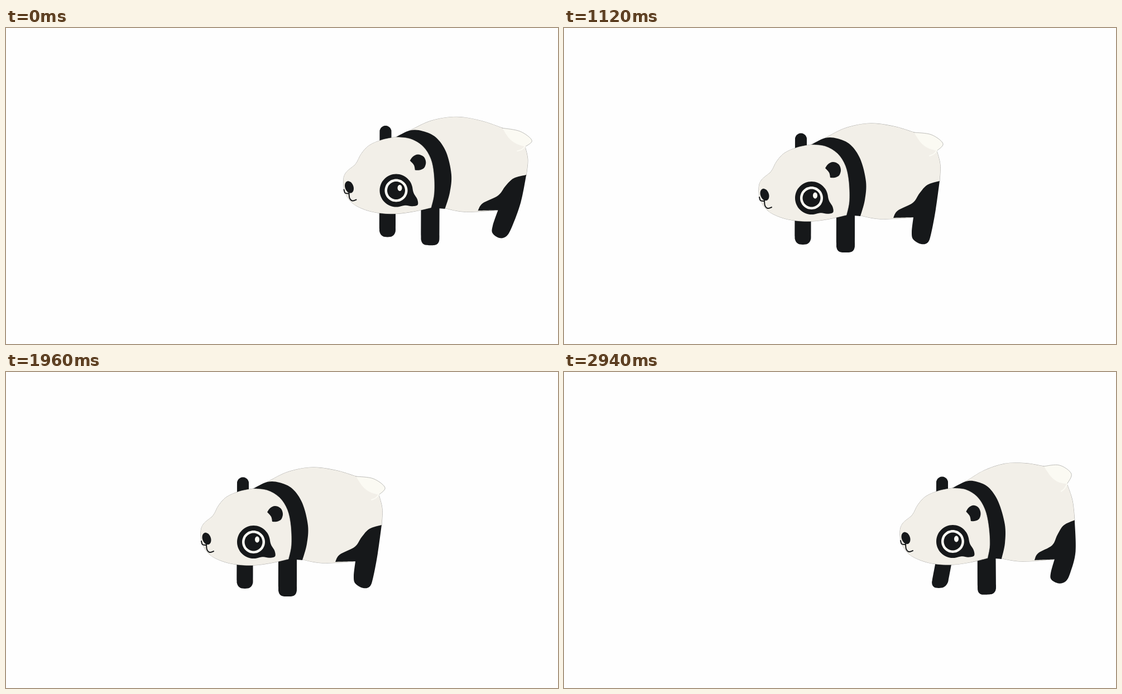
An HTML page with a canvas that plays this animation: 989 px wide and 566 px high, repeating every 3.08 s.

```html
<!DOCTYPE html>
<html lang="en">
<head>
<meta charset="utf-8">
<title>Panda walk</title>
<style>
  html, body { margin: 0; width: 100%; height: 100%; overflow: hidden; background: #fefefe; }
  canvas { display: block; }
</style>
</head>
<body>
<canvas id="stage" width="989" height="566"></canvas>
<script>
const ctx = document.getElementById('stage').getContext('2d');
const CREAM = '#f2efe8', BLACK = '#16181a', TAIL = '#fbfaf3', EDGE = '#a3a29e';
const STEP = 140, LAST = 11;
const EYE = { x: 443.5, y: 304.5 };

const lerp = (a, b, t) => a + (b - a) * t;
const clamp = v => Math.max(0, Math.min(1, v));

// Where the eye is, how far the rump is lifted, how far the animal rears up,
// and how the far front leg and the hind leg swing.
const keys = [
  { at: 0, x: 699, y: 291, lift: -0.15, turn: 0, far: 0, hind: -0.25 },
  { at: 1, x: 696.5, y: 303.5, lift: 0.45, turn: 0, far: -0.2, hind: -0.15 },
  { at: 4, x: 598, y: 304, lift: 0.82, turn: 0, far: -0.17, hind: -0.05 },
  { at: 5, x: 564, y: 304, lift: 1, turn: 0, far: 0.12, hind: 0 },
  { at: 6, x: 513, y: 304, lift: 0.65, turn: 0, far: 0, hind: 0 },
  { at: 8, x: 443.5, y: 304.5, lift: 0, turn: 0, far: 0, hind: 0 },
  { at: 9, x: 383, y: 284, lift: 0, turn: 0.27, far: 0, hind: 0 },
  { at: 10, x: 380, y: 215, lift: 0, turn: 1, far: 0, hind: 0 },
  { at: 11, x: 376, y: 193, lift: 0, turn: 1.1, far: 0, hind: 0 }
];

function poseAt(i) {
  const n = Math.max(1, keys.findIndex(k => k.at >= i));
  const [a, b] = [keys[n - 1], keys[n]];
  const t = (i - a.at) / (b.at - a.at);
  return Object.fromEntries(Object.keys(a).map(k => [k, lerp(a[k], b[k], t)]));
}

// Carries a point of the standing animal into a pose.
const makeWarp = pose => ([x, y]) => {
  const back = Math.max(0, x - 459) / 168;
  const high = Math.max(0, 340 - y) / 153;
  const low = Math.max(0, y - 310);
  const leg = Math.max(0, y - 340);
  const swing = x < 460 ? pose.far : x > 560 ? pose.hind : 0;

  const dx = x - EYE.x - 45 * pose.lift * back * high + leg * (swing + 0.28 * pose.turn);
  const dy = y - EYE.y + leg * 0.25 * pose.turn
    - pose.lift * (38 * back ** 2 * high ** 1.5 + 0.2 * back * low);

  // The muzzle turns less than the rest.
  const angle = pose.turn * (1.05 - 0.3 * clamp((EYE.x - x) / 80));
  const c = Math.cos(angle), s = Math.sin(angle);
  return [pose.x + dx * c - dy * s, pose.y + dx * s + dy * c];
};

// Runs of smooth points; a slash marks a corner.
const shape = s => s.split('/').map(run =>
  run.trim().split(/\s+/).map(p => p.split(',').map(Number)));

function oval(x, y, rx, ry, tilt = 0, bulge = () => 1) {
  const n = 32, c = Math.cos(tilt), s = Math.sin(tilt);
  return [Array.from({ length: n }, (_, i) => {
    const a = (i / n - 0.5) * 2 * Math.PI, k = bulge(a);
    const u = rx * k * Math.cos(a), v = ry * k * Math.sin(a);
    return [x + u * c - v * s, y + u * s + v * c];
  })];
}

// Limb from a flat root to a rounded end; square = 1 gives a half circle.
function limb(x, root, end, width, square) {
  const r = width / 2, depth = Math.sign(end - root) * r;
  const soft = v => Math.sign(v) * Math.abs(v) ** square;
  const tip = Array.from({ length: 13 }, (_, i) => {
    const a = Math.PI * i / 12;
    return [x - r * soft(Math.cos(a)), end - depth + depth * soft(Math.sin(a))];
  });
  return [[[x - r, root], ...tip, [x + r, root]], [[x - r, root]]];
}

const tear = a => 1 + 0.57 * Math.exp(-(((a - 0.58) / 0.3) ** 2));

const art = {
  farLeg: limb(428, 338, 388, 29, 0.8),
  farEar: limb(424.5, 220, 188.5, 21, 1),
  trunk: shape(`443,209 468,197 505,179 548,171 590,176 627,187 / 655,203 668,220 /
    674,245 673,274 / 640,315 626,339 / 566,342 524,334 / 480,240 443,209`),
  thigh: shape(`590,340 598,327 625,313 637,296 651,281 673,274 /
    666,325 658,367 652,384 640,387 626,379 623,366 626,339 / 590,340`),
  nearLeg: limb(504.5, 330, 402, 33, 0.6),
  collar: shape('443,209 468,197 490,198 513,209 531,235 541,275 539,308 531,337 / 506,335 / 443,209'),
  skull: shape(`443,209 418,214 395,224 381,239 371,257 354,272 349,287 352,308 365,327
    388,339 415,345 445,346 475,342 506,335 / 511,310 510,275 504,247 490,225 468,212 443,209`),
  nearEar: shape('468,251 473,244 482,240 492,244 496,254 493,264 485,268 477,268 / 475,259 468,251'),
  patch: oval(443.5, 304.5, 29.5, 29.5, 0, tear),
  ring: oval(443.5, 304.5, 20.5, 20.5),
  iris: oval(443.5, 304.5, 16, 16),
  glint: oval(450, 300, 4, 5.5),
  nose: oval(359.5, 298.5, 7.5, 11, -0.35),
  tail: shape('627,187 658,191 679,207 668,220 / 652,215 639,205 627,187')
};

const strokes = {
  tailEdge: shape('627,187 658,191 679,207 668,220'),
  tuft: shape('668,220 662,226 655,229'),
  lip: shape('350,303 352,309 358,310'),
  smile: shape('359,308 360,318 365,323 372,321')
};

function addRun(path, pts, loop) {
  const n = pts.length;
  const at = i => loop ? pts[(i + n) % n] : pts[Math.max(0, Math.min(n - 1, i))];
  for (let i = 0; i < (loop ? n : n - 1); i++) {
    const [a, b, c, d] = [at(i - 1), at(i), at(i + 1), at(i + 2)];
    path.bezierCurveTo(
      b[0] + (c[0] - a[0]) / 6, b[1] + (c[1] - a[1]) / 6,
      c[0] - (d[0] - b[0]) / 6, c[1] - (d[1] - b[1]) / 6, c[0], c[1]);
  }
}

function trace(runs, closed) {
  const path = new Path2D();
  const loop = closed && runs.length === 1;
  path.moveTo(...runs[0][0]);
  runs.forEach((run, i) => addRun(path, i ? [runs[i - 1].at(-1), ...run] : run, loop));
  if (closed) path.closePath();
  return path;
}

function build(pose) {
  const warp = makeWarp(pose);
  const cel = {};
  const add = (set, closed) => {
    for (const name in set) cel[name] = trace(set[name].map(run => run.map(warp)), closed);
  };
  add(art, true);
  add(strokes, false);
  return cel;
}

const cels = Array.from({ length: LAST + 1 }, (_, i) => build(poseAt(i)));

function fill(color, ...paths) {
  ctx.fillStyle = color;
  paths.forEach(path => ctx.fill(path));
}

function line(color, width, ...paths) {
  ctx.strokeStyle = color;
  ctx.lineWidth = width;
  paths.forEach(path => ctx.stroke(path));
}

function draw(c) {
  ctx.fillStyle = '#fefefe';
  ctx.fillRect(0, 0, 989, 566);
  ctx.lineCap = ctx.lineJoin = 'round';
  fill(BLACK, c.farLeg, c.farEar);
  line(EDGE, 1, c.trunk);
  fill(CREAM, c.trunk);
  fill(BLACK, c.thigh);
  fill(TAIL, c.tail);
  line(EDGE, 0.7, c.tailEdge);
  line(TAIL, 2, c.tuft);
  fill(BLACK, c.nearLeg, c.collar);
  line(EDGE, 1, c.skull);
  fill(CREAM, c.skull);
  fill(BLACK, c.nearEar, c.patch);
  fill(TAIL, c.ring);
  fill(BLACK, c.iris);
  fill(TAIL, c.glint);
  fill(BLACK, c.nose);
  line(BLACK, 2, c.lip, c.smile);
}

function tick() {
  const i = Math.floor(performance.now() / STEP) % (2 * LAST);
  draw(cels[i <= LAST ? i : 2 * LAST - i]);
  requestAnimationFrame(tick);
}
tick();
</script>
</body>
</html>
```
